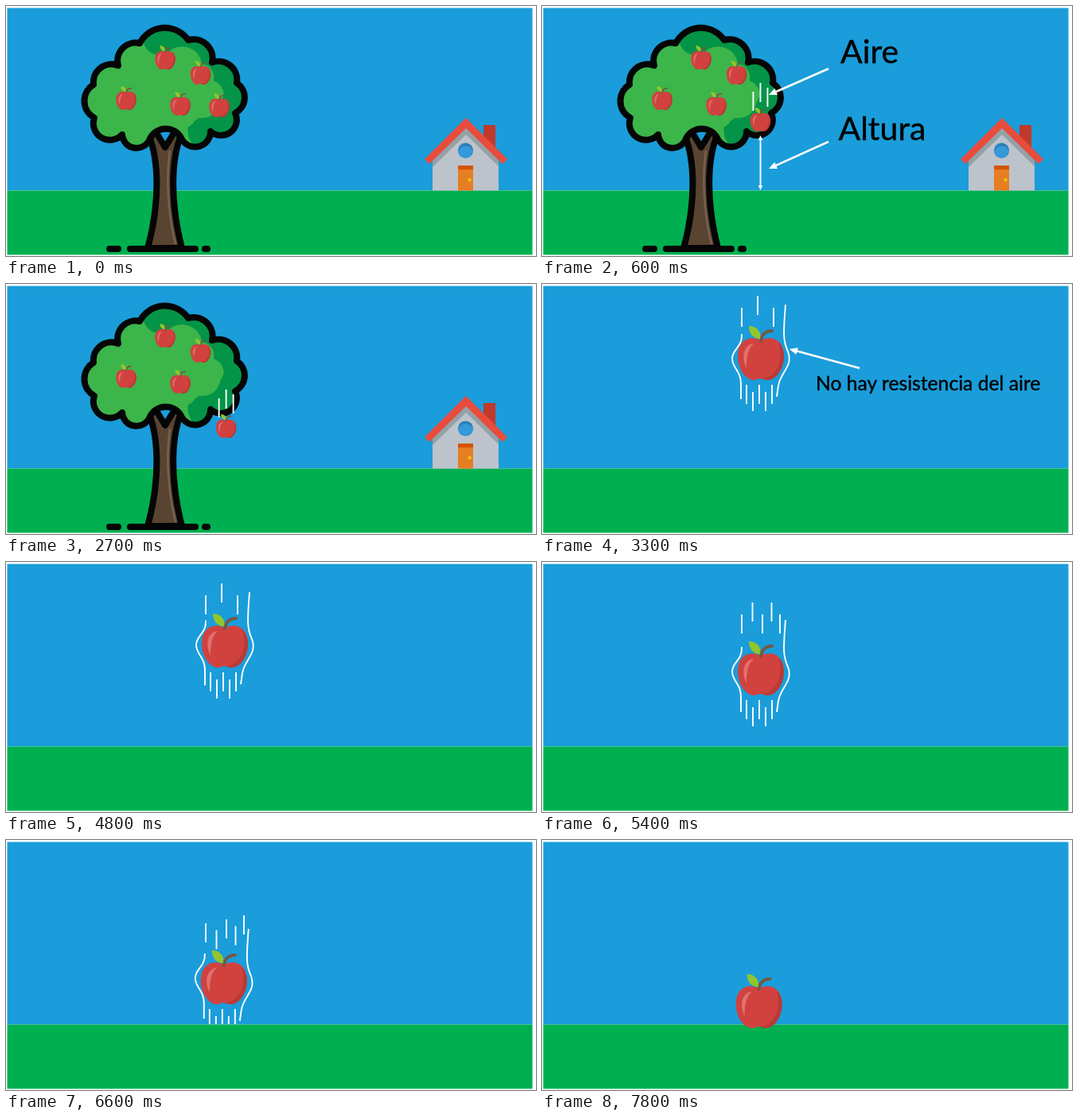
Animation of 666x315 px, one loop 8000 ms. Source, as an HTML page:

```html
<!DOCTYPE html>
<html lang="es">
<head>
<meta charset="utf-8">
<title>Caída de una manzana</title>
<style>
html, body { margin: 0; width: 100%; height: 100%; overflow: hidden; background: #fff; }
svg { display: block; width: 666px; height: 315px; }
text { font-family: Lato, "Open Sans", sans-serif; fill: #000; stroke: #000; stroke-width: 0.4; }
.ink { stroke: #050505; stroke-width: 8; stroke-linecap: round; stroke-linejoin: round; }
.air { fill: none; stroke: #fff; stroke-width: 1.9; }
.pointer .air { stroke-width: 2.5; }
.pointer path + path { fill: #fff; }
</style>
</head>
<body>
<svg viewBox="0 0 666 315">
  <defs>
    <path id="crown"/>
    <clipPath id="crownClip"><use href="#crown"/></clipPath>
    <clipPath id="skyClip"><rect width="666" height="232"/></clipPath>
    <g id="apple">
      <path fill="#d1423f" d="M0 -23 C11 -29 29 -26 29 -3 C29 13 19 27 9 27 C4 27 3 25 0 25 C-3 25 -4 27 -9 27 C-19 27 -29 13 -29 -3 C-29 -26 -11 -29 0 -23 Z"/>
      <path fill="#b93a37" d="M22 -20 C28 -15 29 -8 29 -3 C29 13 19 27 9 27 C5 27 3 26 0 25 C17 25 30 6 22 -20 Z"/>
      <path fill="#e0716e" d="M-9 -19 C-20 -18 -26 -4 -18 12 C-18 0 -17 -12 -9 -19 Z"/>
      <path fill="none" stroke="#75583f" stroke-width="4" stroke-linecap="round" d="M0 -22 C1 -30 6 -35 14 -35"/>
      <path fill="#93c52d" d="M-1 -25 C-10 -25 -15 -32 -15 -41 C-5 -41 1 -34 -1 -25 Z"/>
    </g>
    <path id="leftFlow" class="air" d="M-24 -31 C-23 -14 -36 -12 -36 0 C-36 12 -25 15 -25 32 V51"/>
    <path id="rightFlow" class="air" d="M31 -68 C28 -30 28 -22 34 -9 C41 10 25 16 22 34 L20 48"/>
  </defs>

  <rect x="1.500" y="2.500" width="660" height="230" fill="#1a9dda"/>
  <rect x="1.500" y="232.500" width="660" height="81" fill="#00b050"/>

  <g id="garden">
    <path class="ink" fill="#594431" d="M179 162 C193 195 193 250 178 305 H221 C207 250 206 195 221 160 L214 155 L200 178 L186 155 Z"/>
    <path fill="none" stroke="#76614f" stroke-width="2.500" d="M206 182 C201 215 203 260 213 300"/>
    <path class="ink" fill="none" d="M130 306 H141 M156 306 H238 M250 306 H253"/>
    <use href="#crown" fill="#049447"/>
    <path clip-path="url(#crownClip)" fill="#3cb54a" d="M90 30 L172 42 C174 58 188 66 203 60 C211 46 243 48 246 73 C257 74 263 84 261 94 C273 99 277 112 270 120 C266 138 254 142 243 141 C235 144 236 150 229 152 C226 165 235 175 245 190 H90 Z"/>
    <use href="#crown" class="ink" fill="none"/>

    <rect x="600" y="150" width="15" height="32" fill="#c0392b"/>
    <path fill="#bdc3cb" d="M536 195 L578 153 L619 195 V232.500 H536 Z"/>
    <path fill="#95a1a6" d="M578 153 L619 194 V202 L578 162 L536 203 V195 Z"/>
    <path fill="#e84c3d" d="M578 141 L630 193 L624 199 L578 154 L532 199 L526 193 Z"/>
    <circle cx="577.500" cy="182" r="9.500" fill="#2980b9"/>
    <ellipse cx="577.500" cy="184" rx="9" ry="7.500" fill="#3498db"/>
    <rect x="568" y="201" width="19" height="31.500" fill="#e67e22"/>
    <rect x="568" y="201" width="19" height="5" fill="#d35400"/>
    <circle cx="582.500" cy="219" r="2.200" fill="#f1c40f"/>
  </g>
  <g id="poses"></g>
</svg>
<script>
const LOOP = 8000, STEP = 600, HOLD = 1500, SMALL = 0.44;
const CLOSE_UP = 2 * STEP + HOLD + STEP;
const byId = id => document.getElementById(id);
const garden = byId("garden"), layer = byId("poses");

const use = (id, x, y, s = 1) => `<use href="#${id}" transform="translate(${x} ${y}) scale(${s})"/>`;
const air = d => `<path class="air" d="${d}"/>`;
const label = (x, y, size, words) => `<text x="${x}" y="${y}" font-size="${size}">${words}</text>`;
const repeat = (n, make) => Array.from({ length: n }, (_, i) => make(i)).join("");

// Lobes run clockwise from nick to nick, rounder at the bottom
function crownPath() {
  const nicks = [[181, 167], [146, 162], [111, 141], [110, 99], [141, 75], [168, 47],
    [229, 43], [259, 71], [290, 97], [288, 135], [257, 158], [220, 166]];
  const lobes = nicks.slice(1).map(([x, y], i) => {
    const [px, py] = nicks[i];
    const r = Math.hypot(x - px, y - py) * (y + py > 280 ? 0.51 : 0.58);
    return `A${r} ${r} 0 0 1 ${x} ${y}`;
  });
  return `M${nicks[0]}${lobes.join("")}A22 22 0 0 0 ${nicks[0]}Z`;
}

function arrow(x1, y1, x2, y2, size = 10) {
  const turn = Math.atan2(y2 - y1, x2 - x1) * 180 / Math.PI;
  const len = Math.hypot(x2 - x1, y2 - y1);
  return `<g class="${size > 8 ? "pointer" : ""}" transform="translate(${x1} ${y1}) rotate(${turn})">` +
    air(`M0 0H${len - size / 2}`) +
    `<path fill="#fff" d="M${len} 0l${-size} ${-size * 0.45}v${size * 0.9}z"/></g>`;
}

// The small apple drops evenly and drifts to the right
function onTree(k) {
  const x = 268 + 10 * Math.sin(0.7 * k), y = 128 + 18 * k;
  const trail = k ? [-38, -49, -43].map((dy, i) => `M${x + 9 * (i - 1)} ${y + dy}v24`).join("") : "";
  return use("apple", x, y, SMALL) + air(trail || "M0 0");
}

// Staggered dashes above and below the large apple
function wind(x, y, k) {
  const few = k < 2, late = k > 2;
  const stagger = late ? 11 : -15, slope = late ? -2.5 : 0;
  const above = repeat(few ? 3 : 5, i => {
    const dx = few ? 20 * i : 14 * i - i * i / 2;
    return `M${251 + dx} ${y - (few ? 64 : 75) + slope * i + stagger * (i % 2)}v24`;
  });
  const below = repeat(5, i => `M${x - 18 + 8 * i} ${y + 33 + 9 * (i % 2)}v24`);
  return `<g clip-path="url(#skyClip)">${air(above + below)}` +
    use("leftFlow", x, y - 1.5 * k) + use("rightFlow", x, y) + "</g>";
}

const heights = [94, 106, 141, 161, 180, 210, 210];
function closeUp(k) {
  const x = 275 - 1.2 * Math.max(0, Math.min(k, 5) - 3), y = heights[k];
  return use("apple", x, y) + (k < 6 ? wind(x, y, k) : "");
}

const notes = {
  1: arrow(360, 79, 285, 112) + arrow(360, 171, 285, 205) +
    arrow(274.5, 198, 274.5, 163, 6) + arrow(274.5, 198, 274.5, 232, 6) +
    label(375, 72, 41, "Aire") + label(372.5, 169, 41, "Altura"),
  4: arrow(399, 106, 311, 82) + label(344, 134, 24.7, "No hay resistencia del aire")
};

byId("crown").setAttribute("d", crownPath());
garden.innerHTML += [[200, 68], [244.5, 87], [151, 119], [219, 126]]
  .map(([x, y]) => use("apple", x, y, SMALL)).join("");
layer.innerHTML = repeat(11, i => `<g>${i < 4 ? onTree(i) : closeUp(i - 4)}${notes[i] || ""}</g>`);
const groups = [...layer.children];

// Poses with notes are held longer
let clock = 0;
const starts = groups.map((_, i) => {
  const at = clock;
  clock += notes[i] ? HOLD : STEP;
  return at;
});

function draw(now) {
  const t = now % LOOP;
  const current = starts.findLastIndex(at => at <= t);
  groups.forEach((g, i) => { g.style.display = i === current ? "" : "none"; });
  garden.style.display = t < CLOSE_UP ? "" : "none";
}

const start = performance.now();
function tick() {
  draw(performance.now() - start);
  requestAnimationFrame(tick);
}
tick();
</script>
</body>
</html>
```
